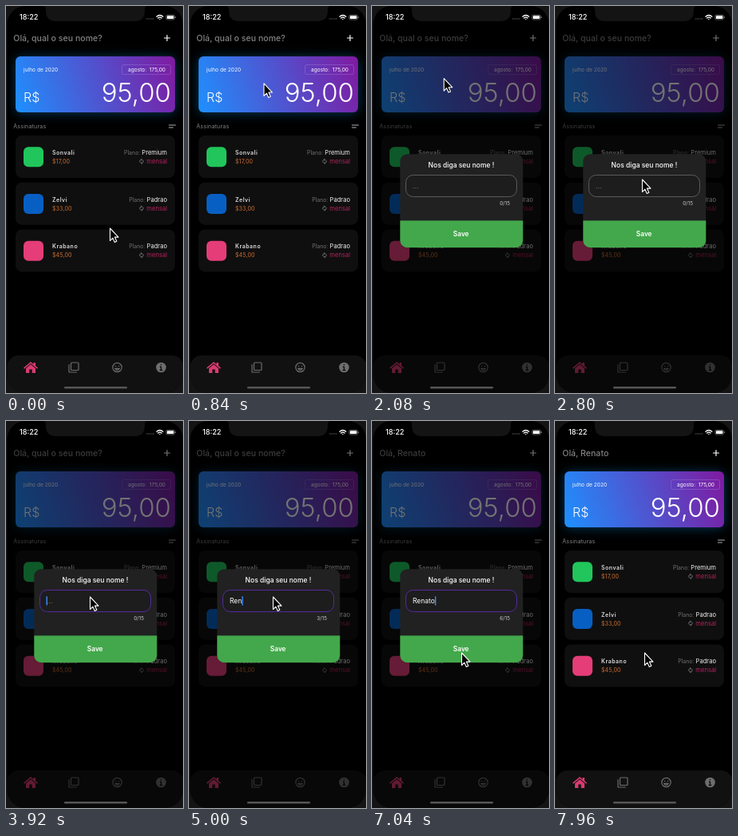
An HTML page that plays this animation: 222x484 px, repeating every 8000 ms.

```html
<!DOCTYPE html>
<html lang="pt">
<head>
<meta charset="utf-8">
<title>Assinaturas</title>
<style>
html, body { margin: 0; width: 100%; height: 100%; overflow: hidden; background: #141414; }
svg { display: block; width: 222px; height: 484px; }
text { font-family: Inter, Roboto, sans-serif; font-size: 7px; fill: #fff; white-space: pre; }
.end { text-anchor: end; }
.mid { text-anchor: middle; }
.line { fill: none; stroke-linecap: round; stroke-linejoin: round; }
</style>
</head>
<body>
<svg viewBox="0 0 222 484">
  <defs>
    <linearGradient id="blend" gradientUnits="userSpaceOnUse" x1="12" y1="133" x2="212" y2="63">
      <stop offset="0" stop-color="#1e90ff"/>
      <stop offset="1" stop-color="#8019a0"/>
    </linearGradient>
    <filter id="glow" x="-20%" y="-50%" width="140%" height="200%">
      <feGaussianBlur stdDeviation="7"/>
    </filter>
    <clipPath id="screen"><rect x="1.500" y="0" width="220.500" height="484" rx="23"/></clipPath>
    <clipPath id="dialog"><rect x="35.300" y="185.200" width="154" height="117" rx="9"/></clipPath>
  </defs>

  <rect width="222" height="484" fill="#141414"/>
  <g clip-path="url(#screen)">
    <rect width="222" height="484"/>

    <text id="hello" x="9.300" y="43.700" style="font-size:10.500px;font-weight:500;letter-spacing:.05px;fill:#828282"></text>
    <path d="M198.500 40h7M202 36.500v7" class="line" stroke="#fff" stroke-width="1.200"/>

    <rect x="12" y="64" width="200" height="70" rx="7" fill="#0c70b0" opacity=".5" filter="url(#glow)"/>
    <rect x="12" y="63" width="200" height="70" rx="6" fill="url(#blend)"/>
    <text x="22" y="82" style="font-size:6.500px;letter-spacing:.07px">julho de 2020</text>
    <rect x="145.500" y="73.500" width="61" height="12" rx="2" fill="none" stroke="#a58be0" stroke-opacity=".5" stroke-width=".7"/>
    <text x="200" y="82" class="end" style="font-size:6.600px">agosto:  175,00</text>
    <text x="22" y="120" style="font-size:16px;font-weight:300">R$</text>
    <text x="207" y="120" class="end" style="font-size:33px;font-weight:300">95,00</text>

    <text x="9.300" y="152.600" style="letter-spacing:.22px;fill:#858585">Assinaturas</text>
    <path d="M204.500 149h8M204.500 152h5" class="line" stroke="#c4c4c4" stroke-width=".9"/>

    <g id="rows"></g>

    <rect x="1" y="437" width="222" height="70" rx="15" fill="#111"/>
    <path d="M31 445 22 452.500l1 1.200 8-6.700 8 6.700 1-1.200-3-2.500v-4h-2.500v2ZM25 453.300l6-5 6 5v5.700h-4.300v-4.500h-3.400v4.500H25Z" fill="#d93a72"/>
    <g class="line" stroke="#6c6c6c" stroke-width="1.200">
      <rect x="81.500" y="446" width="9.500" height="9.500" rx="1"/>
      <path d="M79 448.500v9.500h9.500"/>
      <circle cx="139.500" cy="452" r="5.700"/>
      <path d="M136.700 453.300q2.800 4 5.600 0ZM137.300 450.300h.4M141.300 450.300h.4"/>
    </g>
    <circle cx="194.500" cy="452" r="6.300" fill="#6e6e6e"/>
    <path d="M194.500 448.400v.4M193.500 451.300h1v4M193.200 455.500h2.600" class="line" stroke="#111" stroke-width="1.500"/>

    <rect id="shade" width="222" height="484"/>

    <g id="modal" clip-path="url(#dialog)">
      <rect x="35" y="185" width="155" height="118" fill="#212121"/>
      <rect x="35" y="268.400" width="155" height="34" fill="#43a84b"/>
      <text x="112" y="202" class="mid" style="font-size:8.500px;font-weight:500">Nos diga seu nome !</text>
      <rect id="field" x="42.500" y="211.500" width="139" height="27" rx="9" fill="#1d1d1d"/>
      <text id="typed" x="51" y="228" style="font-size:8.500px"></text>
      <rect id="caret" y="219.300" width="1.400" height="11.200" fill="#3f8cff"/>
      <text id="count" x="173" y="249" class="end" style="font-size:6.400px;fill:#ccc"></text>
      <text x="111.700" y="288" class="mid" style="font-size:8.300px;font-weight:600">Save</text>
    </g>

    <text x="17" y="17.300" style="font-size:9.100px;font-weight:500">18:22</text>
    <g transform="translate(-.6 0)">
      <g fill="#666">
        <circle cx="177.500" cy="16" r=".7"/><circle cx="180" cy="16" r=".7"/>
        <circle cx="182.500" cy="16" r=".7"/><circle cx="185" cy="16" r=".7"/>
      </g>
      <path d="M189.500 13.200q4-3.400 8 0M191.200 15.100q2.300-2 4.600 0M193.400 16.700h.2" class="line" stroke="#fff" stroke-width="1.300"/>
      <rect x="201.500" y="11.300" width="10.500" height="5.700" rx="1.600" fill="none" stroke="#888" stroke-width=".7"/>
      <rect x="202.500" y="12.300" width="8.500" height="3.700" rx=".8" fill="#fff"/>
      <path d="M213.200 13.300v1.700" stroke="#888" stroke-width=".9"/>
    </g>
    <rect x="73" y="476" width="79" height="2.600" rx="1.300" fill="#555"/>
  </g>
  <path d="M46 0q4 0 4 4v2q0 13 13 13h98q13 0 13-13v-2q0-4 4-4Z" fill="#141414"/>

  <path id="pointer" d="M.5 0v15.500l3.400-3.400 2.400 5.400 2.500-1.200-2.400-5.200h4.600Z" fill="#000" stroke="#fff" stroke-width="1.100" stroke-linejoin="round"/>
</svg>
<script>
const LOOP = 8000, STEP = 40;
const NAME = 'Renato';
const KEYS = [4360, 4620, 4880, 5180, 5460, 5740];
const FOCUS = 3280, SAVED = 7000;
const PATH = [
  [0, 130, 278], [240, 130, 278], [1120, 82, 40], [1840, 82, 40], [2520, 109, 217],
  [2840, 109, 217], [3200, 105, 220], [6080, 105, 220], [6720, 112, 290], [LOOP, 112, 290]
];
const PLANS = [
  ['Sonvali', '$17,00', 'Premium', '#20c65b'],
  ['Zelvi', '$33,00', 'Padrao', '#075fc4'],
  ['Krabano', '$45,00', 'Padrao', '#e43d78']
];

const $ = id => document.getElementById(id);
const clamp = x => Math.max(0, Math.min(1, x));
const smooth = x => x * x * (3 - 2 * x);
const ramp = (t, from, to) => smooth(clamp((t - from) / (to - from)));

$('rows').innerHTML = PLANS.map(([name, price, plan, color], i) => `
  <g transform="translate(0 ${162 + i * 58.7})">
    <rect x="12" width="200" height="53" rx="8" fill="#0f0f0f"/>
    <rect x="22" y="14.300" width="25" height="25" rx="6" fill="${color}"/>
    <text x="58" y="24" style="font-weight:600;letter-spacing:.5px;fill:#ddd">${name}</text>
    <text x="58" y="35" style="font-weight:500;letter-spacing:.1px;fill:#b4602c">${price}</text>
    <text x="202" y="24" class="end" style="fill:#707070">Plano: <tspan style="font-size:7.600px;fill:#eee">${plan}</tspan></text>
    <text x="202" y="35" class="end" style="font-size:7.600px;fill:#b3235e">mensal</text>
    <g class="line" stroke="#888" stroke-width=".8">
      <path d="M168.200 33.700A2.200 2.200 0 0 1 170 30.100M171.800 30.900A2.200 2.200 0 0 1 170 34.500"/>
      <path d="M169.600 29.200l.9.900-.9.900M170.400 33.600l-.9.900.9.900"/>
    </g>
  </g>`).join('');

function pointerAt(t) {
  const i = PATH.findIndex(p => p[0] > t);
  const [t0, x0, y0] = PATH[i - 1], [t1, x1, y1] = PATH[i];
  const k = ramp(t, t0, t1);
  return [x0 + (x1 - x0) * k, y0 + (y1 - y0) * k];
}

function draw(t) {
  const [x, y] = pointerAt(t);
  $('pointer').setAttribute('transform', `translate(${x} ${y})`);

  const saved = t >= SAVED, focused = t >= FOCUS;
  $('hello').textContent = saved ? `Olá, ${NAME}` : 'Olá, qual o seu nome?';
  $('shade').setAttribute('opacity', .55 * ramp(t, 1300, 1640) * (1 - ramp(t, 7080, 7440)));
  $('modal').setAttribute('opacity', ramp(t, 1400, 1740) * (1 - ramp(t, 7080, 7400)));

  const n = KEYS.filter(k => t >= k).length;
  const typed = $('typed');
  typed.textContent = n ? NAME.slice(0, n) : '...';
  typed.style.fill = n ? '#fff' : '#777';
  $('count').textContent = `${n}/15`;
  $('field').setAttribute('stroke', focused ? '#55299f' : '#5a5a5a');
  $('caret').setAttribute('x', 51 + (n ? typed.getComputedTextLength() : -.5));
  $('caret').setAttribute('opacity', focused ? 1 : 0);
}

function tick() {
  const t = performance.now() % LOOP;
  draw(Math.floor(t / STEP) * STEP);
  requestAnimationFrame(tick);
}
tick();
</script>
</body>
</html>
```
